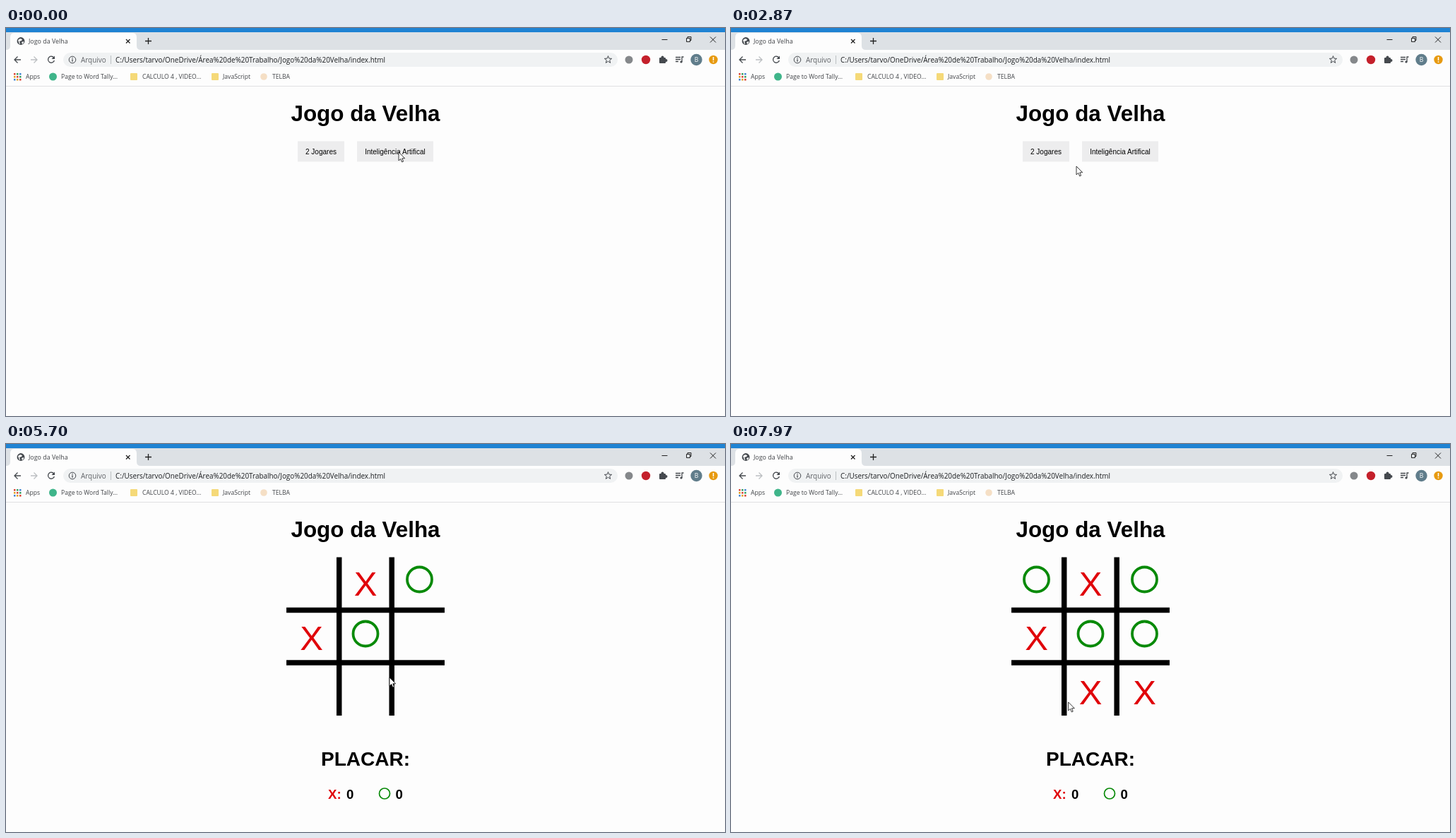
Animation of 1018x550 px, one loop 8000 ms. Source, as an HTML page:

```html
<!DOCTYPE html>
<html lang="pt">
<head>
<meta charset="utf-8">
<title>Jogo da Velha</title>
<style>
html, body { margin: 0; width: 100%; height: 100%; overflow: hidden; background: #fdfdfd; }
svg { display: block; width: 1018px; height: 550px; }
text { font-family: "Liberation Sans", Arial, sans-serif; white-space: pre; }
.ui text { font: 8.6px "Open Sans", "Noto Sans", sans-serif; fill: #404347; }
.ui .tab { font-size: 8.9px; }
.ui .url { font-size: 9.92px; fill: #1d1f22; }
.ui .dim { fill: #606367; }
.line { fill: none; stroke: #45494e; stroke-width: 1.3; }
.dark { stroke: #222; }
.thin { stroke-width: 1; }
.pale { stroke: #bcbfc2; }
.bold { font-weight: bold; }
.mid { text-anchor: middle; }
.x { fill: #e0040a; }
.o { fill: none; stroke: #088a08; }
</style>
</head>
<body>
<svg viewBox="0 0 1018 550">
  <defs>
    <path id="arrow" d="M5 0H-4M.5-4.5L-4 0 .5 4.5"/>
    <rect id="folder" width="10" height="10" rx="1" fill="#f5d978"/>
  </defs>

  <g class="ui">
    <rect width="1018" height="6" fill="#1f83d3"/>
    <rect y="6" width="1018" height="25" fill="#dde1e5"/>
    <path d="M0 31q6 0 6-6V13q0-6 6-6H179q6 0 6 6V25q0 6 6 6Z" fill="#fdfdfd"/>
    <rect y="82" width="1018" height="1" fill="#e0e1e3"/>

    <!-- tab and window buttons -->
    <circle cx="21" cy="18.5" r="5.4" fill="#45494e"/>
    <path d="M17 17l3-2 3 1-1 2-3 1 1 3-1 1ZM22 20l3-1v2l-2 2Z" fill="#fdfdfd"/>
    <text class="tab" x="32" y="22">Jogo da Velha</text>
    <path class="line dark" d="M170 16l5.5 5.500m0-5.500l-5.500 5.500M197 18.500h9m-4.500-4.500v9"/>
    <path class="line dark thin" d="M928.500 16.500h8M963.500 14.500h5v5h-5ZM965 14.500v-2h5v5h-1.500M997 12.500l8 8m0-8l-8 8"/>

    <!-- toolbar -->
    <use href="#arrow" class="line" x="16" y="45"/>
    <use href="#arrow" class="line pale" transform="translate(40 45) scale(-1 1)"/>
    <path class="line" d="M68 42.500A4.500 4.500 0 1 0 68.400 46"/>
    <path d="M69 39.500v4.500h-4.500Z" fill="#45494e"/>
    <rect x="81" y="35" width="785" height="20" rx="10" fill="#f0f2f3"/>
    <circle class="line thin" cx="94" cy="45" r="4.800"/>
    <path class="line" d="M94 44.300v3.500M94 42v1.300"/>
    <text class="url dim" x="106" y="48.500">Arquivo</text>
    <path class="line pale thin" d="M148.500 39v12"/>
    <text class="url" x="155" y="48.500">C:/Users/tarvo/OneDrive/Área%20de%20Trabalho/Jogo%20da%20Velha/index.html</text>
    <polygon id="star" class="line thin"/>
    <circle cx="882" cy="45" r="5.500" fill="#85888b"/>
    <circle cx="906" cy="45" r="6.200" fill="#c4202b"/>
    <g fill="#45494e">
      <rect x="925" y="42" width="9" height="8" rx="1"/>
      <circle cx="929.500" cy="41.500" r="2"/>
      <circle cx="934.500" cy="46" r="2"/>
      <circle cx="956" cy="48" r="1.600"/>
    </g>
    <path class="line" d="M948 41.500h7m-7 3h7m-7 3h4M957 48v-7h2.500"/>
    <circle cx="977.500" cy="45" r="8.200" fill="#607d8b"/>
    <text class="mid" x="977.500" y="48" style="fill:#fff">B</text>
    <circle cx="1001.500" cy="45" r="6.200" fill="#e79a10"/>
    <path d="M1001.500 41v5m0 1.300v1.400" stroke="#fff" stroke-width="1.500"/>

    <!-- bookmarks -->
    <g id="apps"></g>
    <text x="28" y="72">Apps</text>
    <circle cx="66.500" cy="69" r="5.500" fill="#3fb58a"/>
    <text x="78" y="72">Page to Word Tally...</text>
    <use href="#folder" x="176" y="64"/>
    <text x="193" y="72">CALCULO 4 , VIDEO...</text>
    <use href="#folder" x="291" y="64"/>
    <text x="307" y="72">JavaScript</text>
    <circle cx="365" cy="69" r="4.800" fill="#f5dfc5"/>
    <text x="377" y="72">TELBA</text>
  </g>

  <text class="bold mid" x="509" y="132" font-size="31.400">Jogo da Velha</text>

  <g id="menu" font-size="10">
    <path d="M413 160.500h66v29h-66ZM497 160.500h108v29h-108Z" fill="#ededee"/>
    <text class="mid" x="446" y="178.500">2 Jogares</text>
    <text class="mid" x="551" y="178.500">Inteligência Artifical</text>
  </g>

  <g id="game">
    <path d="M471.700 160.500V385M546.200 160.500V385M397 235.500H621M397 310H621" stroke="#000" stroke-width="7.500"/>
    <g id="marks"></g>
    <text class="bold mid" x="509" y="456" font-size="28">PLACAR:</text>
    <g class="bold" font-size="18.600">
      <text class="x" x="456" y="503">X:</text>
      <text x="482" y="503">0</text>
      <circle class="o" cx="536" cy="495.500" r="7.500" stroke-width="1.700"/>
      <text x="551.500" y="503">0</text>
    </g>
  </g>

  <path id="cursor" d="M0 0V12L2.800 9.500 4.700 14 6.600 13.200 4.800 8.800H8.700Z" fill="#fff" stroke="#222" stroke-width=".9"/>
</svg>
<script>
const LOOP = 8000, START = 3500;
const $ = id => document.getElementById(id);
const repeat = (n, make) => Array.from({ length: n }, (_, i) => make(i));

// Cells are numbered 0 to 8, row by row.
const cell = n => [432.5 + 76.5 * (n % 3), 192 + 77 * Math.floor(n / 3)];

// The computer answers each X at once with an O.
const turns = [
  { at: 4200, x: 1, o: 4 },
  { at: 5130, x: 3, o: 2 },
  { at: 6080, x: 7, o: 0 },
  { at: 7330, x: 8, o: 5 }
];

// The pointer wanders through the rests and stops at every cell it clicks.
const rests = [
  [0, 556, 176], [1300, 198, 96], [2470, 440, 255], [2870, 489, 196],
  [START, 548, 175], [4730, 358, 277], [5700, 543, 331], [7200, 579, 349],
  [LOOP, 477, 366]
];
const stops = [...rests, ...turns.map(turn => [turn.at, ...cell(turn.x)])]
  .sort((a, b) => a[0] - b[0]);

$('marks').innerHTML = turns.map(({ x, o }) => {
  const [xx, xy] = cell(x), [ox, oy] = cell(o);
  return `<g><text class="x mid" x="${xx}" y="${xy + 22.5}" font-size="49">X</text>
    <circle class="o" cx="${ox}" cy="${oy}" r="17.5" stroke-width="3.8"/></g>`;
}).join('');

const colors = ['#dc4437', '#35a060', '#4285d4', '#e0a020'];
$('apps').innerHTML = repeat(9, i => `<rect x="${11 + i % 3 * 4}" y="${64 + Math.floor(i / 3) * 4}"
  width="2.5" height="2.5" fill="${colors[i % 4]}"/>`).join('');

$('star').setAttribute('points', repeat(10, i => {
  const r = i % 2 ? 2.3 : 5.4, a = i * Math.PI / 5;
  return [852.5 + r * Math.sin(a), 45 - r * Math.cos(a)];
}).join(' '));

const show = (el, on) => { el.style.display = on ? '' : 'none'; };

function pointer(t) {
  const i = stops.findIndex(stop => stop[0] > t);
  const [t0, x0, y0] = stops[i - 1], [t1, x1, y1] = stops[i];
  const k = (t - t0) / (t1 - t0), ease = k * k * (3 - 2 * k);
  return [x0 + (x1 - x0) * ease, y0 + (y1 - y0) * ease];
}

const began = performance.now();
function draw() {
  const t = (performance.now() - began) % LOOP;
  show($('menu'), t < START);
  show($('game'), t >= START);
  turns.forEach(({ at }, i) => show($('marks').children[i], t >= at));
  $('cursor').setAttribute('transform', `translate(${pointer(t)})`);
  requestAnimationFrame(draw);
}
draw();
</script>
</body>
</html>
```
